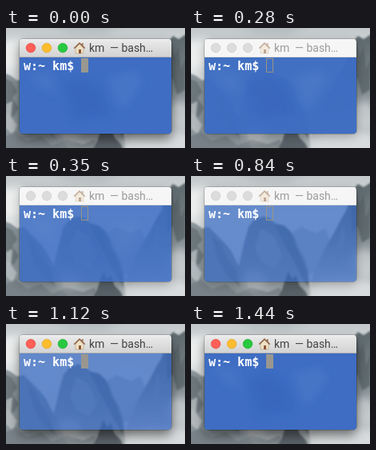
Animation of 224 by 151 pixels, one loop 1.61 s. Source, as an HTML page:

```html
<!DOCTYPE html>
<html lang="en">
<head>
<meta charset="utf-8">
<title>Terminal window fade</title>
<style>
html, body { margin: 0; width: 100%; height: 100%; overflow: hidden; }
svg { display: block; width: 100vw; height: 100vh; }
.title { font: 14px Roboto, "Open Sans", sans-serif; }
.shell { font: bold 15px "DejaVu Sans Mono", monospace; fill: #fff; white-space: pre; }
</style>
</head>
<body>
<svg viewBox="0 0 224 151" preserveAspectRatio="none">
  <defs>
    <linearGradient id="sky" x2="0" y2="1">
      <stop offset="0" stop-color="#c3c9cb"/>
      <stop offset=".3" stop-color="#dde0e1"/>
      <stop offset="1" stop-color="#dcdfe0"/>
    </linearGradient>
    <linearGradient id="dome" x2="0" y2="1">
      <stop offset="0" stop-color="#7b878c"/>
      <stop offset=".5" stop-color="#8c969a"/>
      <stop offset="1" stop-color="#a3abae"/>
    </linearGradient>
    <linearGradient id="tower" x2="0" y2="1">
      <stop offset="0" stop-color="#5c676c"/>
      <stop offset=".45" stop-color="#7c878c"/>
      <stop offset="1" stop-color="#d3d7d9"/>
    </linearGradient>
    <linearGradient id="bar" x2="0" y2="1">
      <stop offset="0" stop-color="#ebebeb"/>
      <stop offset="1" stop-color="#d2d2d2"/>
    </linearGradient>
    <filter id="soft" x="-20%" y="-20%" width="140%" height="140%"><feGaussianBlur stdDeviation=".8"/></filter>
    <filter id="haze" x="-50%" y="-50%" width="200%" height="200%"><feGaussianBlur stdDeviation="5"/></filter>
    <filter id="drop" x="-30%" y="-30%" width="160%" height="160%"><feGaussianBlur stdDeviation="7"/></filter>
    <clipPath id="around">
      <path clip-rule="evenodd" d="M0 0H224V151H0ZM21 14H203Q207 14 207 18V129Q207 133 203 133H21Q17 133 17 129V18Q17 14 21 14Z"/>
    </clipPath>
    <clipPath id="win"><rect x="17" y="14" width="190" height="119" rx="4"/></clipPath>
  </defs>

  <rect width="224" height="151" fill="url(#sky)"/>
  <g filter="url(#haze)">
    <path fill="#a9b1b4" opacity=".6" d="M50 -4H150L120 8 80 6Z"/>
    <path fill="#eceeee" d="M-8 18 20 14 24 48 -8 52Z"/>
  </g>
  <g filter="url(#soft)">
    <path fill="#b8bfc2" d="M120 76 138 64 156 72 168 66 178 90 164 120 146 124Z"/>
    <path fill="url(#tower)" d="M148 151 152 126 160 108 166 94 174 80 181 68 188 54 194 44 198 32 202 18 209 10 216 14 228 6V151Z"/>
    <path fill="#566166" opacity=".7" d="M200 30 207 16 211 36 216 22 219 52 224 38V78L214 84 208 62 202 72Z"/>
    <path fill="#98a2a6" opacity=".6" d="M190 60 194 78 188 98 180 112 182 90Z"/>
    <path fill="url(#dome)" d="M48 151 60 112 66 86 72 64 80 54 90 51 98 53 106 60 116 62 124 69 130 78 134 90 142 104 147 120 150 151Z"/>
    <path fill="#5f6c72" opacity=".65" d="M104 60 117 63 126 72 131 88 139 104 145 120 147 140 138 126 130 110 120 92 112 76Z"/>
    <path fill="#aab3b6" opacity=".65" d="M88 66 104 76 114 100 104 116 88 108 80 90Z"/>
    <path fill="#89949a" d="M-4 56 6 60 14 66 22 64 32 74 42 84 50 94 58 110 68 128 78 155H-4Z"/>
    <path fill="#616c71" opacity=".7" d="M-4 62 8 68 14 80 8 88 16 100 10 112 -4 104Z"/>
    <path fill="#c3c9cb" opacity=".7" d="M0 96 8 92 6 112 14 122 8 134 0 126Z"/>
    <path fill="#6d787d" opacity=".65" d="M26 76 36 84 46 104 56 118 62 140 46 126 34 106Z"/>
    <path fill="#737d82" opacity=".75" d="M-4 138 12 130 26 142 44 136 58 148 76 140 96 146 112 140V155H-4Z"/>
    <path fill="#586267" d="M108 155 114 142 118 130 122 120 127 130 131 124 136 138 144 146 148 155Z"/>
  </g>
  <g filter="url(#haze)" fill="#d9dcde">
    <ellipse cx="190" cy="144" rx="42" ry="14"/>
    <ellipse cx="78" cy="132" rx="16" ry="12" opacity=".45"/>
    <ellipse cx="216" cy="110" rx="14" ry="18" opacity=".6"/>
  </g>

  <g clip-path="url(#around)">
    <rect id="shadow" x="17" y="20" width="190" height="119" rx="5" filter="url(#drop)"/>
    <rect x="16.5" y="13.5" width="191" height="120" rx="4.5" fill="none" stroke="#000" stroke-opacity=".18"/>
  </g>

  <g clip-path="url(#win)">
    <rect x="17" y="37" width="190" height="96" fill="#3468c4" opacity=".7"/>
    <g id="glass">
      <rect x="17" y="37" width="190" height="96" fill="#3e6dc3"/>
      <g filter="url(#haze)">
        <path fill="#5480cb" opacity=".4" d="M128 62 160 54 172 66 158 88 146 104 136 88Z"/>
        <path fill="#345fb4" opacity=".3" d="M70 70 96 60 120 76 132 110 84 116Z"/>
        <path fill="#5480cb" opacity=".3" d="M26 54 58 56 62 84 40 74Z"/>
      </g>
    </g>
    <rect id="head" x="17" y="14" width="190" height="23"/>
    <path d="M17 14.5H207" stroke="#fff" stroke-opacity=".6"/>
    <path id="rule" d="M17 36.5H207"/>
    <g id="lights" stroke-width=".7">
      <circle cx="31" cy="25" r="5.8"/>
      <circle cx="51" cy="25" r="5.8"/>
      <circle cx="71" cy="25" r="5.8"/>
    </g>
    <g id="caption">
      <path fill="#eee0c4" stroke="#a8906c" stroke-width=".5" d="M87 25 92 20 97 25V32H87Z"/>
      <path fill="#8a5836" d="M91 27H94V32H91Z"/>
      <path fill="#9a7450" d="M94.8 19H96.6V23H94.8Z"/>
      <path fill="none" stroke="#94694a" stroke-width="1.7" stroke-linejoin="round" d="M85.3 25.6 92 19 98.7 25.6"/>
      <g class="title" fill="#434343">
        <text x="104" y="30">km</text>
        <text x="130" y="30">— bash…</text>
      </g>
    </g>
    <text class="shell" x="22" y="53">w:~ km$</text>
    <rect id="cursor"/>
  </g>
</svg>
<script>
const LOOP = 1610;
const $ = id => document.getElementById(id);
const set = (el, attrs) => {
  for (const key in attrs) el.setAttribute(key, attrs[key]);
};
const lamps = [["#ff5f57", "#e0443e"], ["#ffbd2e", "#dea123"], ["#28c940", "#1aab29"]];

// Each step: start time, window focus, opacity of the frosted layer.
const steps = [
  [0, true, 1],
  [280, false, 0.9],
  [350, false, 0.45],
  [420, false, 0],
  [1120, true, 0.08],
  [1190, true, 1]
];

function draw(time) {
  const [, focus, frost] = steps.filter(s => s[0] <= time).pop();
  set($("glass"), { opacity: frost });
  set($("shadow"), { opacity: focus ? 0.5 : 0.25, y: focus ? 21 : 18 });
  set($("head"), { fill: focus ? "url(#bar)" : "#f6f6f6" });
  set($("rule"), { stroke: focus ? "#b2b2b2" : "#d8d8d8" });
  set($("caption"), { opacity: focus ? 1 : 0.5 });
  lamps.forEach(([fill, stroke], i) => set($("lights").children[i], {
    fill: focus ? fill : "#dcdcdc",
    stroke: focus ? stroke : "#cecece"
  }));
  set($("cursor"), focus
    ? { x: 94, y: 38, width: 9, height: 18, fill: "#999790", stroke: "none" }
    : { x: 94.5, y: 38.5, width: 8, height: 17, fill: "none", stroke: "#999481" });
}

function tick() {
  draw(performance.now() % LOOP);
  requestAnimationFrame(tick);
}
tick();
</script>
</body>
</html>
```
